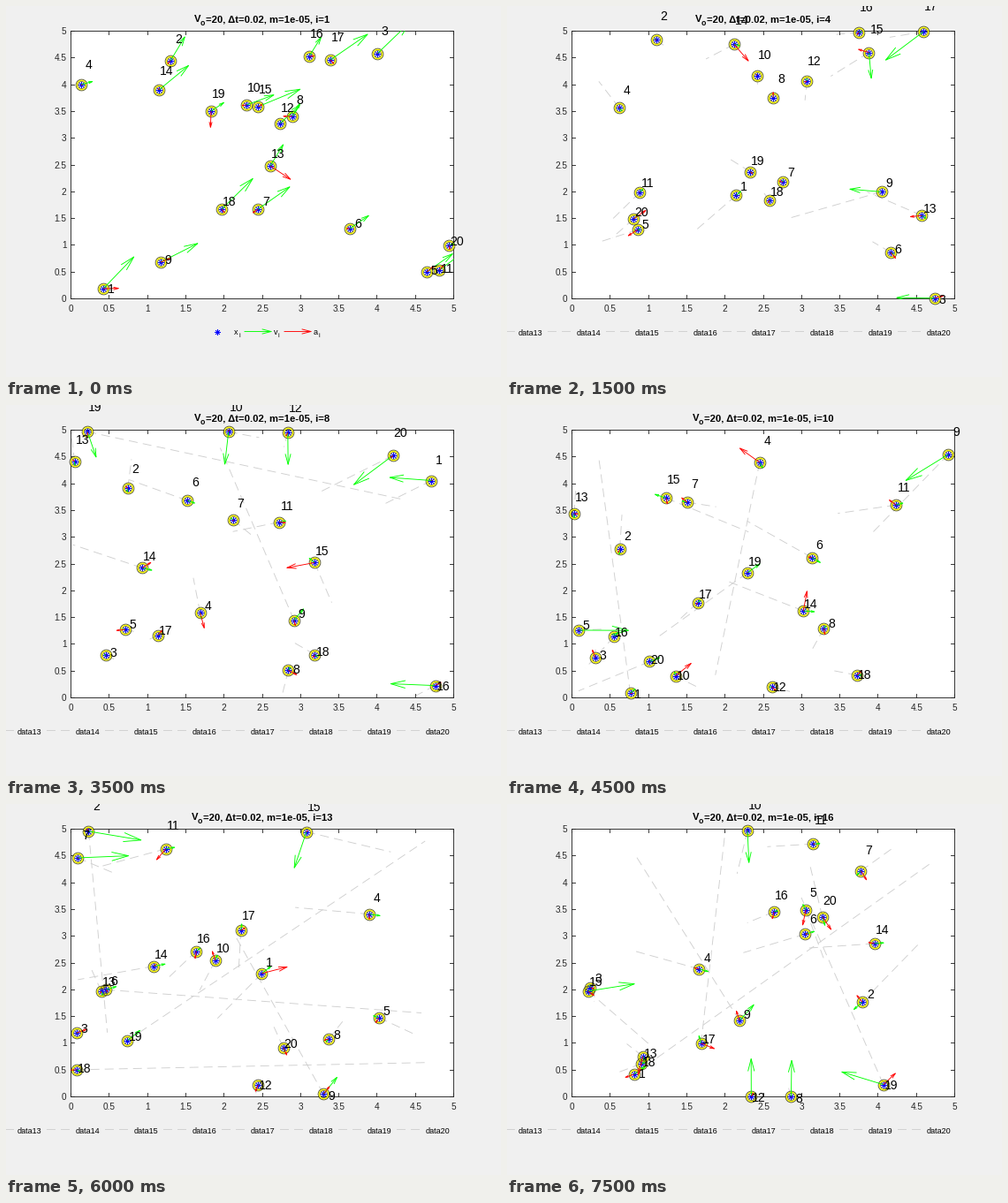
These frames come from a looping animation (560 by 420 pixels, 8000 ms). A matplotlib script:

```python
import numpy as np
import matplotlib.pyplot as plt
from matplotlib.animation import FuncAnimation
from matplotlib.collections import LineCollection
from matplotlib.patches import Rectangle

plt.rcParams["font.family"] = "Liberation Sans"
plt.rcParams["lines.scale_dashes"] = False

W, H, DPI = 560, 420, 80
PX = 72 / DPI                       # points per pixel
N, STEPS = 20, 16
LEFT, TOP, RIGHT, BOTTOM = 73, 28, 507, 331.5
ORIGIN = np.array([LEFT, TOP])
BOX = np.array([RIGHT - LEFT, BOTTOM - TOP])    # the periodic cell
UNIT = BOX / 5
INK, GRAY = "#262626", "#cfcfcf"

START = np.column_stack([
    [110, 186, 420, 85, 476, 389, 285, 324, 175, 272,
     490, 310, 299, 173, 285, 343, 367, 244, 232, 501],
    [320, 62, 54, 89, 301, 252, 230, 125, 290, 112,
     299, 133, 181, 95, 114, 57, 61, 230, 119, 271]])


def polar(size, angle):
    """Pixel vectors; angles turn counter-clockwise on the screen."""
    return np.stack([size * np.cos(angle), -size * np.sin(angle)], axis=-1)


# all particles set off up and to the right, then get a random kick each step
rng = np.random.default_rng(4)
launch = polar(rng.uniform(6, 32, N), np.radians(rng.uniform(8, 62, N)))
kicks = polar(rng.exponential(14, (STEPS, N)), rng.uniform(0, 2 * np.pi, (STEPS, N)))
moves = launch + np.cumsum(kicks, axis=0)
path = START + np.concatenate([np.zeros((1, N, 2)), np.cumsum(moves, axis=0)])
cell = np.floor((path - ORIGIN) / BOX)
place = path - cell * BOX


def velocity(k):
    """Central difference; crossing the border flips it to a long arrow back."""
    if k == 0:
        return launch
    return path[k + 1] - path[k - 1] - 2 * BOX * (cell[k + 1] - cell[k])


def autoscale(vec, base, share):
    """Scale so that the longest arrow is a share of the mean particle spacing."""
    longest = np.hypot(*(vec / UNIT).T).max()
    spread = np.hypot(*(np.ptp(base, axis=0) / UNIT))
    return vec * share * spread / np.sqrt(N) / longest


def arrows(base, vec):
    lines = []
    for p, d in zip(base, vec):
        tip, side = p + d, 0.085 * np.array([-d[1], d[0]])
        neck = tip - 0.33 * d
        lines += [[p, tip], [neck + side, tip, neck - side]]
    return lines


fig = plt.figure(figsize=(W / DPI, H / DPI), dpi=DPI, facecolor="#f0f0f0")
ax = fig.add_axes([0, 0, 1, 1])
ax.set(xlim=(0, W), ylim=(H, 0))
ax.axis("off")


def write(x, y, s, size, ha="left", **kw):
    return ax.text(x, y, s, size=size * PX, ha=ha, va="baseline", **kw)


def stroke(xs, ys, color=INK, width=0.9, **kw):
    return ax.plot(xs, ys, color=color, lw=width * PX, snap=False, **kw)[0]


def lines(color, z, **kw):
    c = LineCollection([], colors=color, linewidths=0.9 * PX, zorder=z, **kw)
    ax.add_collection(c)
    c.set_clip_path(frame)
    return c


# plot box, ticks and tick labels; lines run through pixel centres
frame = Rectangle(ORIGIN, *BOX, fc="white", ec="none", zorder=0)
ax.add_patch(frame)
x0, x1, y0, y1 = LEFT + 0.5, RIGHT - 0.5, TOP + 0.5, BOTTOM
stroke([x0, x1, x1, x0, x0], [y0, y0, y1, y1, y0], zorder=2)
for k in range(11):
    x = np.floor(x0 + (x1 - x0) * k / 10) + 0.5
    y = np.floor(y1 + (y0 - y1) * k / 10) + 0.5
    for edge, d in ((y0, 4), (y1, -4)):
        stroke([x, x], [edge, edge + d], zorder=2)
    for edge, d in ((x0, 4), (x1, -4)):
        stroke([edge, edge + d], [y, y], zorder=2)
    write(x, 346, f"{k / 2:g}", 10, "center", color=INK)
    write(68.5, y + 3.5, f"{k / 2:g}", 10, "right", color=INK)

# title pieces
title_v = write(213, 18.5, "V", 11.3, weight="bold")
title_o = write(220, 22.5, "o", 8.8, weight="bold")
title = write(296.5, 18.5, "", 11.3, "center", weight="bold")

# the two legends
star = dict(marker=(8, 2, 0), ms=6.5 * PX, mec="blue", mew=0.7 * PX, ls="none")
first_key = ax.plot([239], [368.5], **star)
for x, name in ((258, "x"), (303, "v"), (348, "a")):
    first_key += [write(x, 371.5, name, 9), write(x + 5, 375, "i", 7)]
for x, color in ((270, "lime"), (315, "red")):
    for seg in arrows([np.array([x, 368.5])], [np.array([30, 0])]):
        first_key.append(stroke(*np.transpose(seg), color=color))
dash = (0, (10 * PX, 6 * PX))
later_key = []
for k in range(8):
    x = 13 + 66 * k
    later_key += [write(x, 373, f"data{13 + k}", 9),
                  stroke([x - 33, x - 3], [368.5, 368.5], GRAY, ls=dash)]

# moving parts
trails = lines(GRAY, 1, linestyles=[dash])
rings = [ax.plot([], [], "o", ms=2 * r * PX, mfc="none", mec=c, mew=w * PX, zorder=3)[0]
         for r, c, w in ((5.2, "#ffff00", 1.4), (6.4, "#4d4d1a", 0.8), (4, "#4d4d1a", 0.7))]
stars = ax.plot([], [], zorder=4, **star)[0]
green = lines("lime", 5)
red = lines("red", 6)
labels = [write(0, 0, str(n + 1), 14, "center", zorder=7) for n in range(N)]


def draw(k):
    p = place[k]
    shift = 3 if k >= 9 else 0
    title_v.set_x(213 - shift)
    title_o.set_x(220 - shift)
    title.set_text(f"=20, \u0394t=0.02, m=1e-05, i={k + 1}")
    for art in first_key:
        art.set_visible(k == 0)
    for art in later_key:
        art.set_visible(k > 0)

    for art in rings + [stars]:
        art.set_data(p[:, 0], p[:, 1])
    trails.set_segments(np.stack([p, place[k - 1]], axis=1) if k else [])
    green.set_segments(arrows(p, autoscale(velocity(k), p, 0.5)))
    red.set_segments(arrows(p, autoscale(kicks[k], p, 0.25)))
    # labels sit a little right, and 10 % higher than their particle
    for t, (x, y) in zip(labels, p):
        t.set_position((x + 8.7, y - 0.1 * (BOTTOM - y) + 6.5))
    return []


anim = FuncAnimation(fig, draw, frames=STEPS, init_func=lambda: draw(0),
                     interval=500, repeat=True, repeat_delay=0, blit=False)
plt.show()
```
